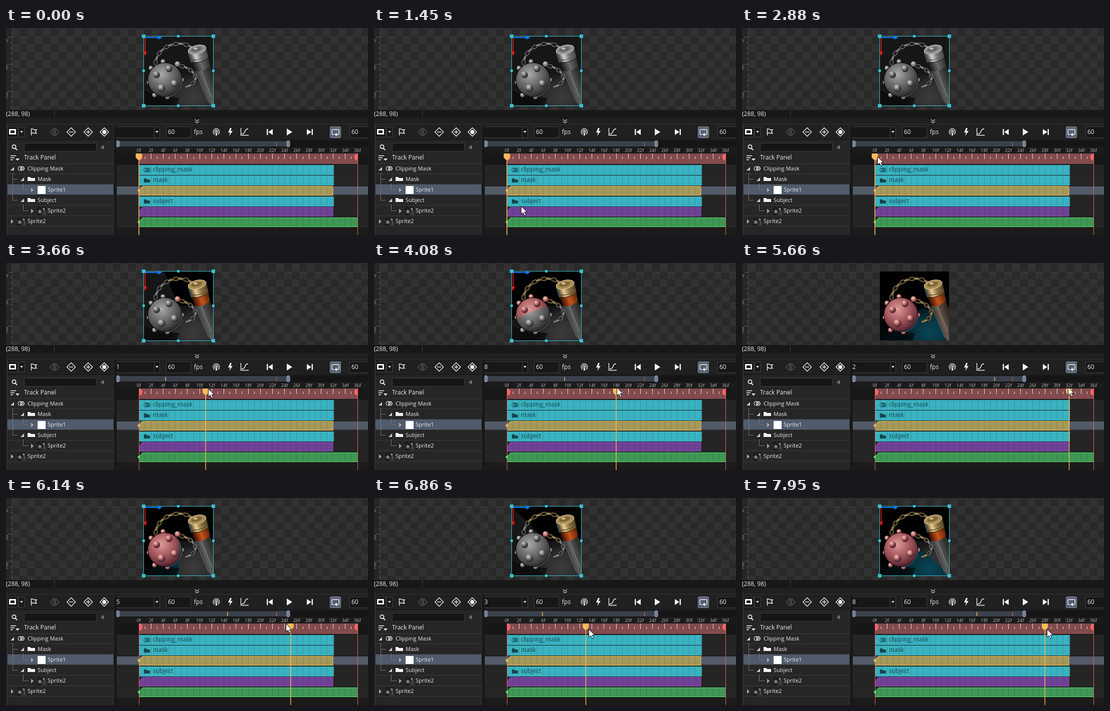
An HTML page that plays this animation: 722x414 px, repeating every 8000 ms.

```html
<!DOCTYPE html>
<html lang="en">
<head>
<meta charset="utf-8">
<title>Clipping mask timeline</title>
<style>
html, body { margin: 0; width: 100%; height: 100%; overflow: hidden; background: #1c1c1c; }
svg { display: block; width: 722px; height: 414px; }
text { font: 12px "Open Sans", "Noto Sans", sans-serif; fill: #ececec; }
.row { font-size: 11px; }
.tick { font-size: 9.3px; fill: #b4b4b4; text-anchor: middle; }
.clip { fill: #17454d; }
.ruler { font-size: 9px; fill: #999; }
.line { fill: none; stroke: #f0f0f0; stroke-width: 1.4; }
.gray { filter: grayscale(1); }
</style>
</head>
<body>
<svg id="stage" viewBox="0 0 722 414" xmlns="http://www.w3.org/2000/svg"></svg>
<script>
const X0 = 265, STEP = 436 / 36;
const stage = document.getElementById('stage');

const rect = (x, y, w, h, fill, more = '') =>
  `<rect x="${x}" y="${y}" width="${w}" height="${h}" fill="${fill}" ${more}/>`;
const path = (d, fill, more = '') => `<path d="${d}" fill="${fill}" ${more}/>`;
const line = (d, color = '#f0f0f0', width = 1.4) =>
  path(d, 'none', `stroke="${color}" stroke-width="${width}"`);
const circle = (x, y, r, fill, more = '') => `<circle cx="${x}" cy="${y}" r="${r}" fill="${fill}" ${more}/>`;
const text = (x, y, s, cls = '') => `<text x="${x}" y="${y}" class="${cls}">${s}</text>`;
const range = (n, fn) => Array.from({ length: n }, (_, i) => fn(i)).join('');
const frameX = f => X0 + f * STEP;

const defs = `<defs>
  <pattern id="check" x="275" y="17" width="31" height="31" patternUnits="userSpaceOnUse">
    ${rect(0, 0, 31, 31, '#292929')}${rect(0, 0, 15.5, 15.5, '#323232')}${rect(15.5, 15.5, 15.5, 15.5, '#323232')}
  </pattern>
  <radialGradient id="ball" cx=".4" cy=".34" r=".7">
    <stop offset="0" stop-color="#dc9c98"/><stop offset=".4" stop-color="#b2656a"/>
    <stop offset=".75" stop-color="#7c3c45"/><stop offset="1" stop-color="#3c1b24"/>
  </radialGradient>
  <radialGradient id="spike" cx=".4" cy=".35" r=".7">
    <stop offset="0" stop-color="#f6d0c8"/><stop offset=".45" stop-color="#c47a79"/><stop offset="1" stop-color="#6d343c"/>
  </radialGradient>
  <radialGradient id="glow" gradientUnits="userSpaceOnUse" cx="374" cy="140" r="52">
    <stop offset="0" stop-color="#0a5062"/><stop offset=".6" stop-color="#083c4b"/><stop offset="1" stop-color="#03161d"/>
  </radialGradient>
  <linearGradient id="brass" x1="0" x2="1" y1=".3" y2="0">
    <stop offset="0" stop-color="#4b3a20"/><stop offset=".25" stop-color="#e6cf98"/>
    <stop offset=".5" stop-color="#8f7543"/><stop offset="1" stop-color="#382b16"/>
  </linearGradient>
  <linearGradient id="wood" x1="0" x2="1" y1=".3" y2="0">
    <stop offset="0" stop-color="#3c1408"/><stop offset=".4" stop-color="#c9541b"/><stop offset="1" stop-color="#431805"/>
  </linearGradient>
  <linearGradient id="grip" gradientUnits="userSpaceOnUse" x1="383" y1="114" x2="413" y2="103">
    <stop offset="0" stop-color="#241b18"/><stop offset=".4" stop-color="#6c5950"/><stop offset="1" stop-color="#352a26"/>
  </linearGradient>
  <clipPath id="box"><rect x="275" y="17" width="138" height="138"/></clipPath>
  <clipPath id="pie"><path id="sector"/></clipPath>
  <clipPath id="tracks"><rect x="220" y="190" width="502" height="224"/></clipPath>
</defs>`;

// Links alternate between open rings and rings seen edge-on along a cubic curve.
function chain(p, n) {
  const at = (t, i) => (1 - t) ** 3 * p[0][i] + 3 * t * (1 - t) ** 2 * p[1][i]
    + 3 * t * t * (1 - t) * p[2][i] + t ** 3 * p[3][i];
  return range(n, k => {
    const t = (k + .5) / n;
    const turn = Math.atan2(at(t + .03, 1) - at(t - .03, 1), at(t + .03, 0) - at(t - .03, 0)) * 180 / Math.PI;
    const ring = (color, width) => `<ellipse rx="6" ry="${k % 2 ? 1.1 : 3.2}" fill="none" stroke="${color}" stroke-width="${width}"/>`;
    return `<g transform="translate(${at(t, 0)} ${at(t, 1)}) rotate(${turn})">${ring('#1d170d', 3.4)}${ring(k % 2 ? '#b39d6c' : '#806c43', 1.6)}</g>`;
  });
}

const rimSpikes = [[289, 80, 5], [313, 67, 5], [342, 72, 6], [284, 109, 4], [296, 134, 5], [322, 138, 5], [351, 104, 5]];
const faceSpikes = [[324, 80, 5.5], [299, 92, 5.5], [309, 119, 6.5], [335, 110, 6]];

function art(back) {
  return rect(275, 17, 138, 138, back)
    + path('M275 155L340 100L362 88L413 118V155Z', 'url(#glow)', 'opacity=".85"')
    + path('M275 155V125L300 138L346 140L340 155Z', '#020a0e', 'opacity=".7"')
    + chain([[347, 76], [372, 78], [396, 108], [357, 118]], 8)
    + path('M376 84L404 70L413 93V155H409L403 148Z', 'url(#grip)')
    + line('M377 86L404 148', '#17829a', 1) + line('M389 84L410 138', '#837369', 2)
    + path('M371 69L403 58L407 75Q393 89 377 86Z', 'url(#wood)')
    + chain([[298, 73], [299, 39], [343, 18], [374, 41]], 10)
    + path('M363 45L399 36L404 59Q391 70 370 69Z', 'url(#brass)', 'stroke="#1b1409"')
    + line('M369 64Q390 66 403 54', '#5c4927', 1.5)
    + '<ellipse cx="381" cy="43" rx="18" ry="8.5" transform="rotate(-13 381 43)" fill="#a88b53" stroke="#e0cc97"/>'
    + '<ellipse cx="380" cy="42.5" rx="11" ry="4.4" transform="rotate(-13 380 42)" fill="#7c6438"/>'
    + '<ellipse cx="378" cy="41" rx="4" ry="2.3" fill="#cbb382"/>'
    + line('M363 48L370 69', '#1b8ca6', 1.1)
    + rimSpikes.map(s => circle(...s, 'url(#spike)', 'stroke="#1a0b0e"')).join('')
    + circle(317, 103.5, 34, 'url(#ball)', 'stroke="#1a0b0e" stroke-width="1.2"')
    + line('M351 108A35 35 0 0 1 320 138.5', '#1b7d93', 1.1)
    + faceSpikes.map(([x, y, r]) => circle(x + 1.5, y + 2, r + 1, '#5a2a33') + circle(x, y, r, 'url(#spike)')).join('');
}

function viewport() {
  const square = (x, y, s) => rect(x - s / 2, y - s / 2, s, s, '#3ac0d1');
  const ends = [274.5, 413.5], tops = [16.5, 155.5];
  return rect(0, 0, 722, 164, 'url(#check)') + rect(12, 18, 710, 1, '#fff', 'opacity=".06"')
    + rect(0, 0, 12, 164, '#262626') + rect(12, 0, 1, 164, '#454545')
    + range(15, i => rect(i % 5 ? 9 : 5, 18 + i * 10.8, i % 5 ? 3 : 7, 1, '#686868'))
    + [['0', 28], ['50', 84], ['100', 143]].map(([s, y]) => `<text class="ruler" transform="translate(4 ${y}) rotate(-90)">${s}</text>`).join('')
    + `<g clip-path="url(#box)"><g id="art">${art('#010101')}</g>
       <g id="cover" clip-path="url(#pie)"><g class="gray" id="gray">${art('#161616')}</g></g></g>`
    + '<g id="gizmo">' + line('M274.5 16.5H413.5V155.5H274.5Z', '#3ac0d1', 1)
    + line('M277 19H308', '#137cf5', 2) + path('M303 15L312 19L303 23Z', '#137cf5')
    + line('M277.5 19V48', '#e81818', 1.6) + path('M274 47H281L277.5 56Z', '#e81818')
    + ends.map(x => tops.map(y => square(x, y, 7)).join('') + square(x, 85.5, 5)).join('')
    + tops.map(y => square(343.5, y, 5)).join('') + '</g>';
}

function statusBar() {
  return rect(0, 164, 722, 250, '#1c1c1c') + rect(0, 164, 722, 16, '#181818')
    + rect(96, 164, 1, 16, '#3a3a3a') + text(0, 176, '(288, 98)')
    + rect(0, 180, 722, 12, '#202020') + line('M377 183L381 186L385 183M377 187L381 190L385 187', '#ccc', 1.2)
    + rect(0, 192, 722, 1, '#333');
}

const folder = (x, y, w, fill) => path(`M${x} ${y - 4}h5l2 2h${w - 7}v6h${-w}Z`, fill);
const rings = (x, y, color) => circle(x - 2, y, 3.8, 'none', `stroke="${color}" stroke-width="1.2"`)
  + circle(x + 2.5, y, 3.8, color, 'opacity=".35"') + circle(x + 2.5, y, 3.8, 'none', `stroke="${color}" stroke-width="1.2"`);
const opened = (x, y) => path(`M${x + 6} ${y - 3}v7h-7Z`, '#ccc');
const closed = (x, y) => path(`M${x} ${y - 4.5}l5 4.5l-5 4.5Z`, '#aaa');
const thumb = (x, y) => `<g transform="translate(${x} ${y}) scale(.116) translate(-275 -17)" clip-path="url(#box)"><use href="#gray"/></g>`;

function leftPanel() {
  const diamond = (x, s) => line(`M${x - s} 208L${x} ${208 - s}L${x + s} 208L${x} ${208 + s}Z`);
  return rect(2, 193, 212, 221, '#262626') + rect(2, 193, 212, 30, '#202020')
    + rect(214, 193, 7, 221, '#181818') + rect(2, 193, 1, 221, '#3b3b3b') + rect(214, 193, 1, 221, '#363636')
    + rect(3, 198, 20, 20, '#121212', 'stroke="#444"') + rect(25, 198, 12, 20, '#191919', 'stroke="#444"')
    + rect(6, 202, 14, 11, '#f4f4f4') + rect(9, 205, 8, 5, '#181818') + path('M28 206h6l-3 4Z', '#ddd')
    + line('M50.5 201V215M50.5 202.5Q53 201 56 203.5L61 203.5L58.5 207L61 210.5H55L51 209')
    + line('M95 201L88 208L95 215ZM99 201L106 208L99 215Z', '#555', 1.2) + rect(96.5, 200, 1, 16, '#555')
    + diamond(130, 8.5) + line('M126 208H134') + diamond(164, 8.5) + line('M160 208H168M164 204V212')
    + diamond(196, 8.5) + circle(196, 208, 4, '#f4f4f4')
    + rect(3, 223, 211, 1, '#151515')
    + circle(16, 237.5, 3.6, 'none', 'class="line" style="stroke-width:1.7"') + line('M18.7 240.5L22 244', '#f0f0f0', 2)
    + rect(36.5, 230.5, 144, 16, '#151515', 'stroke="#3d3d3d" rx="2"') + path('M195 234v9l-6-4.5Z', '#777')
    + line('M9 255.5H20M9 259.5H17M9 263.5H14', '#f0f0f0', 1.6) + path('M19 261h8l-4 4.5Z', '#f0f0f0')
    + text(36, 263, 'Track Panel')
    + range(6, i => rect(3, 271 + 21 * i, 211, 21, i === 2 ? '#505b6b' : '#262626') + rect(3, 291 + 21 * i, 211, 1, '#3a3a3a'))
    + rect(3, 271, 211, 1, '#3a3a3a')
    + line('M13.5 290V344.5H23M13.5 302.5H23M34.5 311V323.5H45M34.5 353V365.5H45', '#777', 1)
    + opened(10, 281) + rings(30, 281, '#f0f0f0') + text(43, 285, 'Clipping Mask', 'row')
    + opened(30, 302) + folder(43, 302, 15, '#f0f0f0') + text(63, 306, 'Mask', 'row')
    + closed(50, 324) + rect(63, 316, 16, 16, '#fff') + text(83, 327, 'Sprite1', 'row')
    + opened(30, 344) + folder(43, 344, 15, '#f0f0f0') + text(63, 348, 'Subject', 'row')
    + closed(50, 366) + thumb(63, 358) + text(83, 369, 'Sprite2', 'row')
    + closed(10, 387) + thumb(23, 379) + text(43, 390, 'Sprite2', 'row');
}

function rightToolbar() {
  const field = (x, w) => rect(x + .5, 197.5, w, 22, '#171717', 'stroke="#3f3f3f"');
  return rect(221, 193, 501, 30, '#202020')
    + field(214, 92) + rect(295, 198, 1, 22, '#3f3f3f') + path('M298 206h6l-3 4Z', '#ddd')
    + '<text id="digit" x="220" y="212"></text>'
    + field(319, 49) + text(323, 212, '60') + text(375, 212, 'fps')
    + circle(419.5, 207.5, 1.8, '#f0f0f0') + line('M416 213A6.3 6.3 0 1 1 423 213M417 210.3A3.6 3.6 0 1 1 422 210.3', '#f0f0f0', 1.2)
    + path('M418 210h3v5h-3Z', '#f0f0f0')
    + path('M447 200L443 209H447L445 216L452 206H448L450 200Z', '#f0f0f0')
    + line('M468.5 200V214.5H484M470 212Q476 211 477 206Q478 202 483 201.5')
    + rect(520, 202, 2.4, 12, '#f4f4f4') + path('M532 202v12l-9-6Z', '#f4f4f4')
    + path('M560 201v14l11-7Z', '#f4f4f4')
    + path('M600 202v12l9-6Z', '#f4f4f4') + rect(609.6, 202, 2.4, 12, '#f4f4f4')
    + rect(646.5, 197.5, 21, 22, '#566174', 'stroke="#8793a6" rx="2"')
    + line('M654 213H652Q650 213 650 211V205Q650 203 652 203H662Q664 203 664 205V211Q664 213 662 213H659') + path('M660 209.5v7l-5-3.5Z', '#f0f0f0')
    + rect(685.5, 197.5, 40, 22, '#171717', 'stroke="#3f3f3f"') + text(689, 212, '60');
}

function timeline() {
  const grip = x => rect(x - 3, 225.5, 6, 12, '#71809a', 'stroke="#98a6bc" rx="2"');
  const keyed = (y, h, end, fill, edge) => path(`M272 ${y + .5}H${end}V${y + h - .5}H265.5V${y + 9}Z`, fill, `stroke="${edge}"`);
  const grid = (y, n) => range(n, i => rect(Math.floor(frameX(i + 1)), y, 1, 17, '#000', 'opacity=".15"'));
  const dot = (y, fill) => path(`M266.5 ${y - 4.5}l-4.5 4.5l4.5 4.5Z`, fill);
  return rect(221, 223, 501, 191, '#1b1b1b')
    + rect(221, 225, 501, 13, '#151515') + rect(222, 226, 342, 11, '#3a414c')
    + rect(539, 228, 1, 8, '#e06464') + '<rect id="mini" y="228" width="1.5" height="8" fill="#f0ae4a"/>' + grip(223) + grip(563)
    + range(19, i => text(frameX(i * 2), 248, i * 2 + 'f', 'tick'))
    + rect(221, 251, 501, 22, '#171717') + rect(265, 251, 437, 21, '#824b4e')
    + range(37, i => rect(Math.floor(frameX(i)), i % 2 ? 257 : 251, 1, i % 2 ? 5 : 11, '#e6dddd'))
    + path('M265 251h3l4 4v6l-4 4h-3Z', '#f56565') + path('M702 251h-3l-4 4v6l4 4h3Z', '#f56565')
    + range(6, i => rect(221, 274 + 21 * i, 501, 20, i === 2 ? '#2d3036' : '#252525'))
    + rect(221, 317, 501, 16, '#535b68')
    + [274, 295, 337].map(y => rect(265, y, 389, 20, '#3ab2c1') + grid(y + 1, 32)).join('')
    + keyed(316, 19, 652, '#a6985b', '#f2ca4c') + grid(317, 31)
    + keyed(358, 19, 652, '#704296', '#8c51bd') + grid(359, 31)
    + keyed(379, 19, 701.5, '#3f9755', '#52e372') + grid(380, 35)
    + rings(281, 284, '#17454d') + text(293, 287, 'clipping_mask', 'clip')
    + folder(275, 305, 12, '#17454d') + text(293, 308, 'mask', 'clip')
    + folder(275, 347, 12, '#17454d') + text(293, 350, 'subject', 'clip')
    + rect(265, 262, 1, 152, '#e06464') + rect(701, 262, 1, 152, '#e06464')
    + dot(325, '#f2ca4c') + dot(388, '#52e372')
    + '<g id="head">' + rect(0, 260, 1.4, 154, '#f7bb58')
    + path('M-5.5 251H6.5V259L2.5 263.5H-1.5L-5.5 259Z', '#f7bb58') + '</g>';
}

stage.innerHTML = defs + viewport() + statusBar() + leftPanel()
  + '<g clip-path="url(#tracks)">' + rightToolbar() + timeline() + '</g>'
  + path('M0 0V16L3.8 12.6L6.7 18.6L9.4 17.4L6.6 11.6H11.6Z', '#fff', 'id="cursor" stroke="#111" stroke-width="1"');

const part = id => document.getElementById(id);
const digit = part('digit'), mini = part('mini'), head = part('head'),
  cursor = part('cursor'), gizmo = part('gizmo'), cover = part('cover'), sector = part('sector');

// time, updates until the next key, cursor x, cursor y, timeline frame
const keys = [
  [0, 1, 305, 440, 0], [1120, 9, 304, 405, 0], [1890, 1, 270, 257, 0], [2880, 1, 270, 257, 0],
  [2980, 8, 280, 257, 1], [3660, 11, 403, 251, 11], [4590, 6, 625, 246, 29], [5130, 1, 653, 247, 32],
  [5660, 6, 650, 248, 32], [6140, 3, 558, 251, 25], [6410, 5, 498, 256, 19], [6860, 1, 428, 262, 13],
  [7140, 8, 434, 262, 13], [7860, 1, 605, 262, 28], [7950, 1, 608, 262, 28], [8000, 1, 608, 262, 28]
];

function pose(t) {
  const i = keys.findIndex((k, n) => t >= k[0] && t < keys[n + 1][0]);
  const a = keys[i], b = keys[i + 1];
  const p = Math.floor((t - a[0]) / (b[0] - a[0]) * a[1] + 1e-6) / a[1];
  return [2, 3, 4].map(n => a[n] + (b[n] - a[n]) * p);
}

function draw(t) {
  const [x, y, raw] = pose(t), f = Math.round(raw);
  cursor.setAttribute('transform', `translate(${Math.round(x) + .5} ${Math.round(y) + .5})`);
  head.setAttribute('transform', `translate(${frameX(f) - .7} 0)`);
  mini.setAttribute('x', 220.5 + f * 8.83);
  digit.textContent = f > 9 ? f % 10 : '';
  const inside = f < 32 ? 'inline' : 'none';
  gizmo.style.display = cover.style.display = inside;

  // The wipe turns one sixteenth every two frames.
  const start = Math.floor(f / 2);
  const rim = range(17 - start, i => {
    const a = (start + i) * Math.PI / 8;
    return `L${344 + 150 * Math.cos(a)} ${86 - 150 * Math.sin(a)}`;
  });
  sector.setAttribute('d', `M344 86${rim}Z`);
}

function tick(now) {
  draw(now % 8000);
  requestAnimationFrame(tick);
}
draw(0);
requestAnimationFrame(tick);
</script>
</body>
</html>
```
